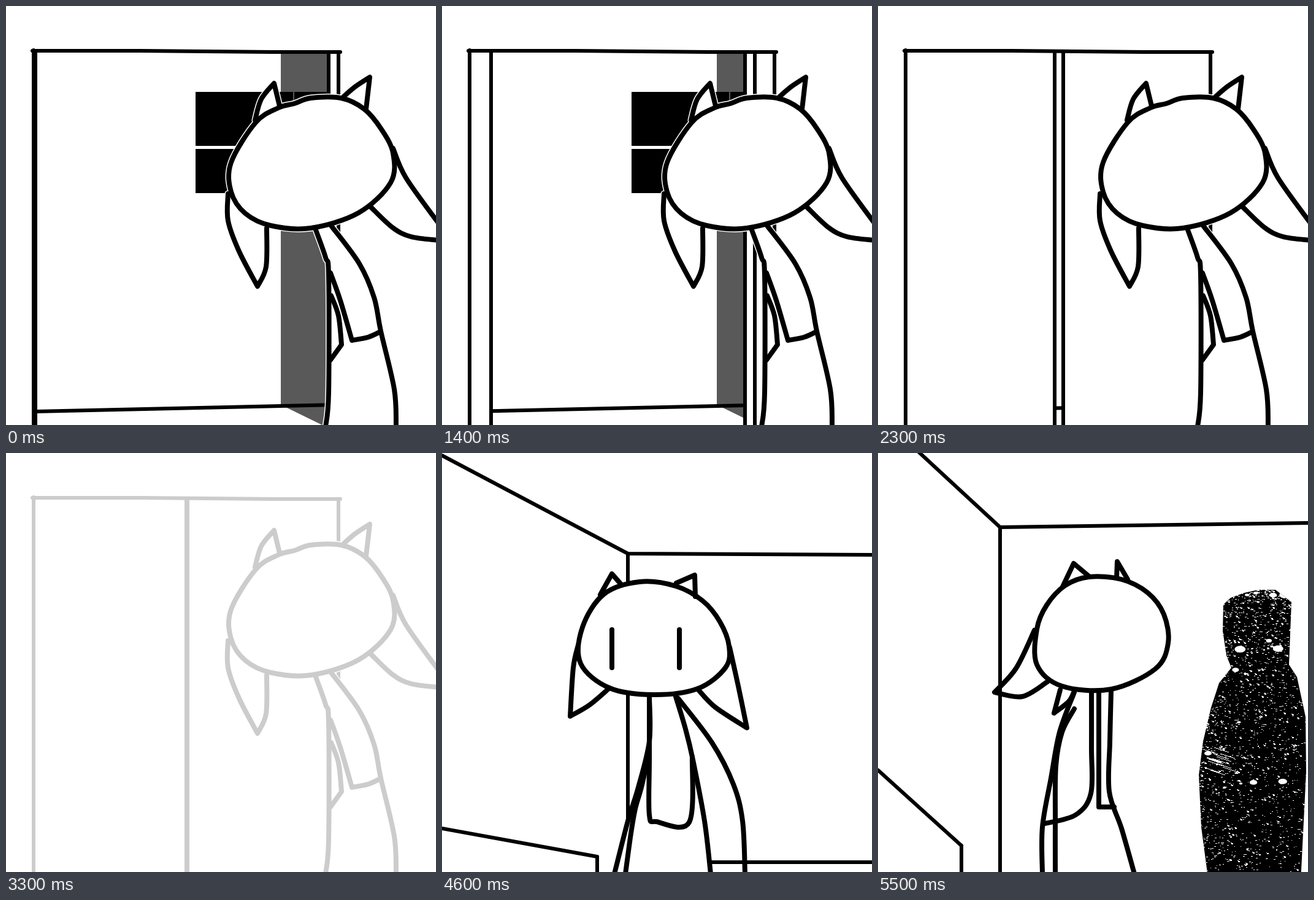
Recreate the animation shown at these times as an HTML page with a canvas. Size 701 by 683 pixels, loop 9500 ms.

```html
<!DOCTYPE html>
<html lang="en">
<head>
<meta charset="utf-8">
<title>The turn</title>
<style>
html, body { margin: 0; width: 100%; height: 100%; overflow: hidden; background: #fff; }
canvas { display: block; }
</style>
</head>
<body>
<canvas id="stage" width="701" height="683"></canvas>
<script>
const W = 701, H = 683, LOOP = 9500;
const ctx = document.getElementById('stage').getContext('2d');
const clamp = (v, lo, hi) => Math.min(hi, Math.max(lo, v));

// "x,y x,y ..." to points; a doubled point is a sharp corner
const points = text => text.split(' ').map(pair => pair.split(',').map(Number));
const mix = (a, b, k) => a.map((p, i) => p.map((v, j) => v + (b[i][j] - v) * k));

function curve(pts, closed = false) {
  const path = new Path2D(), n = pts.length;
  const at = i => closed ? pts[(i + n) % n] : pts[clamp(i, 0, n - 1)];
  path.moveTo(...pts[0]);
  for (let i = 0; i < (closed ? n : n - 1); i++) {
    const [a, b, c, d] = [at(i - 1), at(i), at(i + 1), at(i + 2)];
    if (b[0] === c[0] && b[1] === c[1]) continue;
    path.bezierCurveTo(b[0] + (c[0] - a[0]) / 6, b[1] + (c[1] - a[1]) / 6,
      c[0] - (d[0] - b[0]) / 6, c[1] - (d[1] - b[1]) / 6, ...c);
  }
  if (closed) path.closePath();
  return path;
}

function polygon(pts) {
  const path = new Path2D();
  pts.forEach(p => path.lineTo(...p));
  return path;
}

function stroke(path, color, width) {
  ctx.strokeStyle = color;
  ctx.lineWidth = width;
  ctx.stroke(path);
}

function fill(path, color) {
  ctx.fillStyle = color;
  ctx.fill(path);
}

function rect(color, x, y, w, h) {
  ctx.fillStyle = color;
  ctx.fillRect(x, y, w, h);
}

const line = (ink, ...pts) => stroke(polygon(pts), ink, 6);
const upright = (ink, x, y) => line(ink, [x, y], [x, H + 7]);

// ---- Doorway ----
const backHead = curve(points('497,150 546,150 584,168 612,201 631,240 627,288 575,337 ' +
  '497,362 432,358 390,338 367,303 367,255 407,190 444,166 470,159'), true);
const backHorns = [
  '406,186 416,152 437,126 437,126 446,163',
  '551,147 570,131 593,116 593,116 587,168'
].map(s => curve(points(s)));
const backLeft = points('505,365 521,410 526,440 526,630 521,686');
const backRight = points('530,358 576,420 600,475 611,530 633,625 636,686');
const backBody = polygon([...backLeft, ...[...backRight].reverse()]);
const backLines = [
  ...backHorns, backHead, curve(backLeft), curve(backRight),
  ...[
    '362,306 362,350 380,400 410,457 410,457 424,425 425,362',
    '631,232 652,280 705,354',
    '594,327 630,361 660,376 705,382',
    '529,435 545,480 564,545 564,545 590,540 610,531',
    '530,472 542,505 547,552 547,552 529,577'
  ].map(s => curve(points(s)))
];

function drawRoom(left, right) {
  ctx.save();
  ctx.beginPath();
  ctx.rect(left, 75, Math.max(0, right - left), H);
  ctx.clip();
  rect('#595959', 448, 77, 90, 575);
  fill(polygon(points('452,652 540,652 540,695')), '#595959');
  rect('#000', 309, 140, 229, 165);
  rect('#fff', 309, 228, 139, 5);
  rect('#595959', 468, 139, 2, 166);
  line('#000', [45, 661], [540, 650]);
  ctx.restore();
}

function drawDoorway(step, ink) {
  const closed = step < 10 ? 0 : 1 / (1 + Math.exp(-.61 * (Math.min(step, 27) - 17.1)));
  const gap = 247 * (1 - closed);
  const left = 295 - gap, right = 295 + gap;
  const inner = right - 16 * clamp((gap - 7) / 60, 0, 1);
  drawRoom(left, inner);
  line(ink, [43, 73], [218, 73], [434, 75], [545, 75]);
  upright(ink, 45, 72);
  upright(ink, 542, 75);
  for (const x of [left, right, inner]) upright(ink, Math.round(x), 76);

  backLines.forEach(p => stroke(p, '#fff', 11));
  [...backHorns, backBody, backHead].forEach(p => fill(p, '#fff'));
  backLines.forEach(p => stroke(p, ink, 8));
}

// ---- Turning round: front, three-quarter and back pose of each part ----
const pose = (...texts) => texts.map(points);
const parts = {
  head: pose(
    '322,210 381,217 425,241 453,275 468,315 462,350 417,384 345,394 273,383 226,343 229,284 264,230',
    '325,202 391,202 435,225 469,255 484,301 470,350 425,381 338,384 282,362 251,305 257,258 290,220',
    '344,202 397,206 440,228 466,263 473,310 452,352 380,385 300,380 259,345 259,287 275,248 305,216'),
  leftHorn: pose(
    '258,231 277,197 277,197 291,213',
    '296,213 295,184 295,184 330,200',
    '301,218 319,180 319,180 344,201'),
  rightHorn: pose(
    '382,212 412,199 412,199 413,234',
    '392,202 397,182 397,182 413,207',
    '389,204 390,177 390,177 407,206'),
  leftEar: pose(
    '222,313 214,350 209,429 209,429 240,411 273,383',
    '290,221 205,288 155,359 155,359 210,353 259,343',
    '255,289 225,351 190,390 190,390 235,397 276,373'),
  rightEar: pose(
    '469,317 483,380 497,448 497,448 445,414 417,385',
    '383,388 383,412 390,419 390,419 391,400 401,386',
    '297,386 292,405 287,424 287,424 311,405 320,388'),
  leftSide: pose(
    '338,398 338,470 320,545 303,600 281,686',
    '335,385 318,410 283,490 254,580 233,686',
    '320,390 296,455 282,530 268,610 268,686'),
  rightSide: pose(
    '381,397 397,450 409,500 428,600 438,686',
    '381,388 376,430 378,525 398,605 433,686',
    '380,388 378,470 377,552 397,612 418,686'),
  arm: pose(
    '335,500 325,545 315,580 308,620 299,686',
    '330,407 265,440 205,510 182,600 189,686',
    '320,417 300,455 290,510 289,600 289,686'),
  cape: pose(
    '385,400 440,472 475,540 490,600 494,686',
    '340,388 322,455 305,530 290,585 248,610',
    '348,388 348,480 347,555 322,590 272,604'),
  cloth: pose(
    '338,398 338,500 338,590 350,601 403,602 408,495',
    '350,388 347,450 330,510 331,578 375,584 384,577',
    '360,388 360,480 360,577 360,577 372,577 385,577'),
  leftEye: pose('277,288 277,319 277,350', '445,288 447,318 442,346', '590,288 592,318 590,346'),
  rightEye: pose('387,288 387,319 387,350', '505,288 507,318 505,346', '600,288 600,318 600,346')
};

// ceiling left, corner, ceiling right, floor left, floor corner
const [waitWall, frontWall, sideWall, backWall] = pose(
  '0,36 325,164 701,166 0,620 268,660',
  '0,4 303,164 701,166 0,612 253,658',
  '0,20 357,165 701,126 0,556 227,640',
  '0,-63 199,121 701,114 0,517 136,640');

function drawWalls(turned, swing, ink) {
  const front = turned < 2;
  const [left, corner, right, floor, floorCorner] = front
    ? mix(waitWall, frontWall, (turned + 1) ** 2)
    : mix(backWall, sideWall, swing);
  line(ink, left, corner, right);
  upright(ink, ...corner);
  line(ink, floor, floorCorner);
  upright(ink, ...floorCorner);
  if (front) line(ink, [440, 667], [W, 667]);
}

const visitor = polygon(points('563,247 575,236 597,228 620,223 648,223 674,243 670,345 683,365 ' +
  '697,430 698,520 689,700 539,700 527,610 523,525 530,470 543,415 556,375 576,350 568,330 562,290'));

// Scratches crowd towards the top and the left edge
function makeSpecks() {
  let seed = 7;
  const rnd = () => (seed = seed * 16807 % 2147483647) / 2147483647;
  const path = new Path2D();
  for (let i = 0; i < 2200; i++) {
    const x = Math.round(523 + 176 * rnd() ** 1.3), y = Math.round(223 + 460 * rnd() ** 1.5);
    path.rect(x, y, 1 + Math.floor(rnd() * 3), 1);
    if (rnd() < .12) path.rect(x + 1, y + 1, 3, 2);
  }
  for (let i = 0; i < 40; i++) {
    const x = 530 + 140 * rnd(), y = 228 + 330 * rnd() ** 2.5, r = 1 + 6 * rnd() ** 3;
    path.moveTo(x + r, y);
    path.ellipse(x, y, r * 1.3, r * .8, 0, 0, 7);
  }
  for (let i = 0; i < 14; i++) {
    const x = 523 + 40 * rnd(), y = 480 + 40 * rnd();
    for (let j = 0; j < 8; j++) path.rect(Math.round(x) + j * 3, Math.round(y) + j, 3, 1);
  }
  return path;
}
const specks = makeSpecks();

function drawVisitor(swing) {
  ctx.save();
  ctx.translate(79 * swing, 4 * swing);
  fill(visitor, '#000');
  ctx.clip(visitor);
  fill(specks, '#fff');
  ctx.restore();
}

function drawFigure(k, ink) {
  const from = k < 1 ? 0 : 1;
  const now = {};
  for (const name in parts) now[name] = mix(parts[name][from], parts[name][from + 1], k - from);
  const { head, leftEye, rightEye, leftSide, rightSide, ...rest } = now;
  const face = curve(head, true);
  fill(polygon([...leftSide, ...[...rightSide].reverse()]), '#fff');
  fill(face, '#fff');
  ctx.save();
  ctx.clip(face);
  for (const eye of [leftEye, rightEye]) stroke(curve(eye), ink, 8);
  ctx.restore();
  for (const pts of [leftSide, rightSide, ...Object.values(rest)]) stroke(curve(pts), ink, 8);
  stroke(face, ink, 8);
}

function drawTurn(step, ink) {
  const turned = clamp(step - 46, -1, 9);
  const swing = ((9 - turned) / 5) ** 2.5;
  drawWalls(turned, swing, ink);
  drawVisitor(swing);
  drawFigure(turned < 4 ? Math.max(0, turned / 4) : 2 - swing, ink);
}

function draw(time) {
  const step = Math.floor(time % LOOP / 100);
  const ink = step === 33 || step === 35 ? '#ccc' : '#000';
  rect('#fff', 0, 0, W, H);
  ctx.lineCap = ctx.lineJoin = 'round';
  if (step < 34) drawDoorway(step, ink);
  else if (step > 34) drawTurn(step, ink);
}

function tick() {
  draw(performance.now());
  requestAnimationFrame(tick);
}
tick();
</script>
</body>
</html>
```
